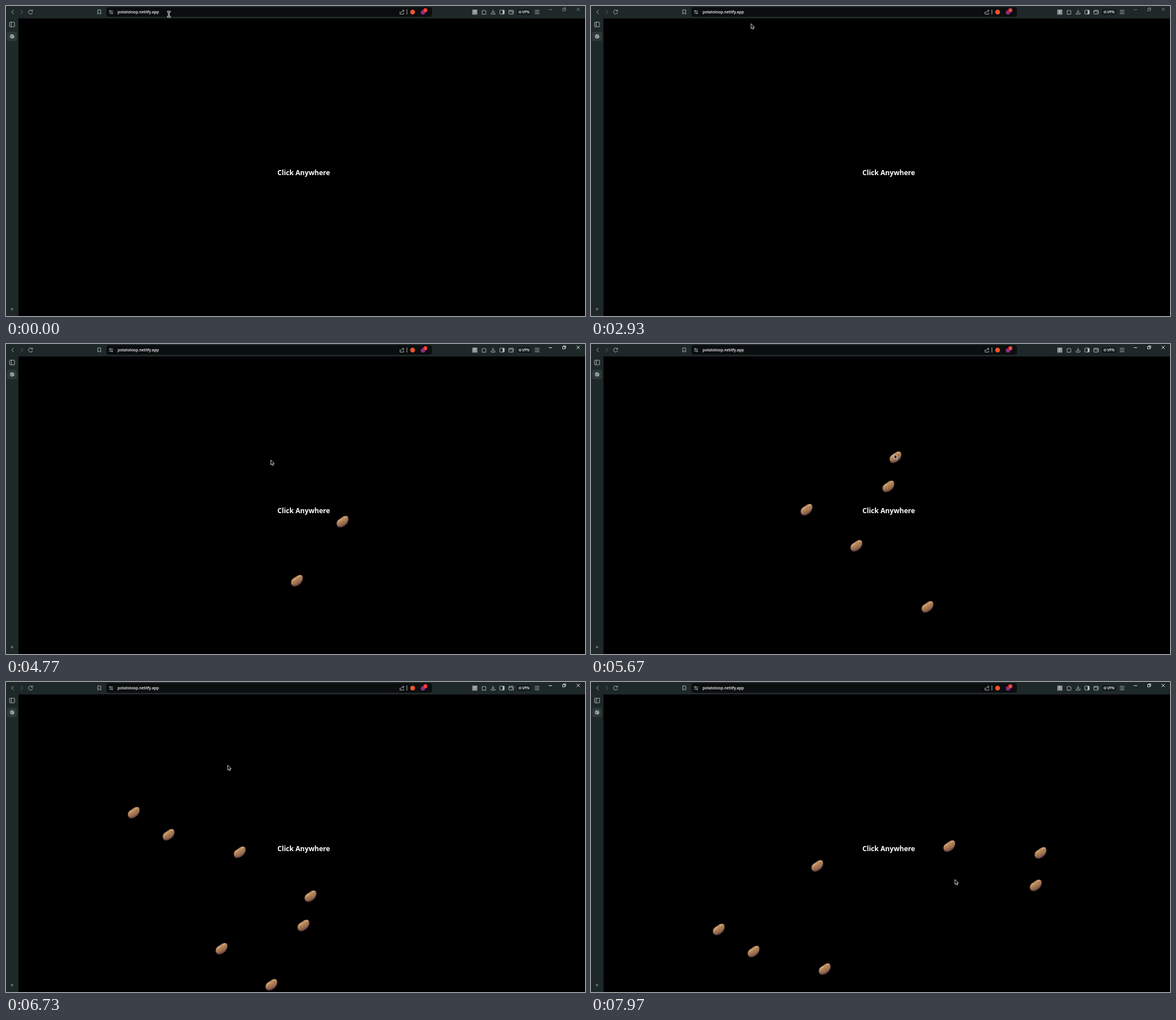
An HTML page that plays this animation: 1022x548 px, repeating every 8000 ms.

```html
<!DOCTYPE html>
<html lang="en">
<head>
<meta charset="utf-8">
<title>Falling potatoes</title>
<style>
html, body { margin: 0; width: 100%; height: 100%; overflow: hidden; background: #000; }
svg { display: block; width: 1022px; height: 548px; }
text { font-family: "Open Sans", "Noto Sans", sans-serif; fill: #fff; }
.line { fill: none; stroke: #bcc4c4; stroke-width: .9; }
</style>
</head>
<body>
<svg viewBox="0 0 1022 548">
  <defs>
    <linearGradient id="skin" x1=".3" y1=".15" x2=".75" y2=".9">
      <stop offset="0" stop-color="#c79c69"/>
      <stop offset=".55" stop-color="#ad7f54"/>
      <stop offset="1" stop-color="#85594a"/>
    </linearGradient>
    <g id="potato">
      <path fill="#6f4a46" d="M-10.6 3.6C-10.6-1-7.6-3.8-4-5.6C-1.4-7.2 1.6-10.3 6-10.3C9.8-10.3 11-6 10.4-2.2C9.2 4.6 1.5 10.2-4.5 10.2C-8.5 10.2-10.6 7.6-10.6 3.6Z"/>
      <path fill="url(#skin)" d="M-10 3.2C-9.8-.8-7-3.2-3.6-4.9C-1-6.5 2-9.6 6-9.6C9-9.6 10-6.6 9.3-3.4C8 2.6 1 7.6-4.8 7.6C-8 7.6-10 6-10 3.2Z"/>
      <path fill="none" stroke="#dcb480" stroke-width="1.2" stroke-linecap="round" d="M-7.8 .6C-6.4-1.4-4-2.6-2-3.6M3-7C4.4-8.1 6-8.4 7.2-7.8"/>
      <path fill="none" stroke="#7b5040" stroke-width=".9" stroke-linecap="round" d="M-5 3.6l1 .5M.5 .2l1.2-.2M5-3.4l1 .4M.6 4l.8-.4M6.4-6h.6"/>
    </g>
  </defs>

  <rect width="1022" height="548" fill="#1f2829"/>
  <rect x="22" y="22" width="1000" height="526"/>
  <rect x="177" y="2" width="575" height="17" rx="4.5" fill="#0b0e0f"/>

  <!-- toolbar -->
  <g class="line">
    <path d="M13.7 7L10 10.7L13.7 14.4"/>
    <path d="M26 7L29.7 10.7L26 14.4" stroke="#667071"/>
    <path d="M46.3 8.5A3.6 3.6 0 1 0 46.9 11.5M46.9 6.6V9.1H44.4"/>
    <path d="M162 7H167.2V14.4L164.6 12.2L162 14.4Z"/>
    <path d="M182 9H182.8M185.2 9H189M182 12.6H185.8M188.2 12.6H189"/>
    <circle cx="184" cy="9" r="1.2"/><circle cx="187" cy="12.6" r="1.2"/>
    <path d="M695.5 10V14.3H702V12M697.5 12C697.5 9.5 699 8.5 702.5 8.5M700.3 6.3L702.6 8.5L700.3 10.7"/>
    <path d="M707.7 6V15"/>
    <path d="M840.3 8.3H842.3A1.3 1.3 0 0 1 844.8 8.3H846.8V10.2A1.2 1.2 0 0 1 846.8 12.5V14.5H840.3V12.5A1.2 1.2 0 0 0 840.3 10.2Z"/>
    <path d="M859.8 6.6V12M857.4 9.8L859.8 12.2L862.2 9.8M856.4 12V14.3H863.2V12"/>
    <rect x="871.6" y="7.3" width="8" height="7" rx="1"/>
    <path d="M878 7.5V14" stroke-width="2.8"/>
    <rect x="887.6" y="7.5" width="8" height="6.8" rx="1.2"/><path d="M888 9.3H895.5M892.6 11.8H895.5"/>
    <path d="M933.5 7.7H941.5M933.5 10.7H941.5M933.5 13.7H941.5"/>
    <rect x="900.5" y="4" width="28" height="13.2" rx="4" style="fill:#161d1f;stroke:#2c3638"/>
    <circle cx="907.3" cy="10.7" r="2"/><path d="M905.2 10.7H909.4"/>
  </g>
  <text x="197" y="13.2" font-size="6.8" font-weight="600">potatoloop.netlify.app</text>
  <text x="911" y="13.1" font-size="6.4" font-weight="600">VPN</text>
  <circle cx="717.7" cy="10.7" r="4.2" fill="#f2552c"/>
  <circle cx="736" cy="11.4" r="3.8" fill="#8f2a86"/>
  <circle cx="740.2" cy="7.5" r="3.7" fill="#e2332c"/>
  <text x="740.2" y="9.5" font-size="5.5" text-anchor="middle">1</text>
  <rect x="823" y="6.3" width="9" height="9" fill="#8b9090"/>
  <text x="827.5" y="13.3" font-size="6.5" text-anchor="middle">T</text>
  <g id="controls" class="line">
    <path d="M958 6.5H964M1007.2 3.2L1012.8 8.8M1012.8 3.2L1007.2 8.8"/>
    <path d="M982.5 4.7H986.5V8.7H982.5ZM984 4.5V3.2H988V7.2H986.7"/>
  </g>

  <!-- sidebar -->
  <rect x="2" y="45.5" width="17" height="16.5" rx="3" fill="#2e383a"/>
  <circle cx="10.8" cy="53.8" r="3.8" fill="#a8b0b1"/>
  <path d="M7.8 53.4L10 54.4L10.4 56.6M11 51L11.6 52.6L13.6 53.2" fill="none" stroke="#2e383a" stroke-width=".9"/>
  <g class="line">
    <rect x="6.3" y="28.6" width="8.8" height="8.2" rx="1"/><path d="M9.3 29V36.6"/>
    <path d="M7.9 535.8H13.3M10.6 533.1V538.5" stroke="#8d9697"/>
  </g>

  <text x="525.5" y="299.4" font-size="12.1" font-weight="700" text-anchor="middle">Click Anywhere</text>
  <g id="potatoes"></g>
  <path id="arrow" d="M0 0V8.7L2 6.9L3.3 9.8L4.8 9.1L3.5 6.3H6.1Z" fill="#000" stroke="#fff" stroke-width=".8"/>
  <g id="beam" fill="none">
    <path d="M-3-4.5H3M-3 4.5H3M0-4.5V4.5" stroke="#fff" stroke-width="2.6"/>
    <path d="M-2.6-4.5H2.6M-2.6 4.5H2.6M0-4.5V4.5" stroke="#111" stroke-width=".9"/>
  </g>
</svg>
<script>
const LOOP = 8000, STEP = 1000 / 30;
const SPEED = 0.1674;   // fall in px per ms
const TRAVEL = 400;     // longest pointer move in ms

// Where the pointer rests, and when it leaves: start, address bar, one per click, end
const stops = [
  [0, 288.5, 16.5], [2850, 254.5, 11],
  [3523, 513.5, 210], [4146, 594, 210], [4774, 468.5, 207], [5095, 380.5, 197],
  [5376, 525, 203], [5649, 537.5, 197], [5958, 412.5, 171], [6149, 287, 172],
  [6382, 225.5, 172], [6910, 399.5, 148], [7155, 632.5, 154], [7385, 785, 262],
  [7597, 793.5, 240],
  [LOOP, 641, 353]
];
const clicks = stops.slice(2, -1);
const $ = id => document.getElementById(id);

const potatoes = clicks.map(() => {
  const use = document.createElementNS("http://www.w3.org/2000/svg", "use");
  use.setAttribute("href", "#potato");
  return $("potatoes").appendChild(use);
});

function place(el, visible, x, y) {
  el.style.display = visible ? "" : "none";
  el.setAttribute("transform", `translate(${x} ${y})`);
}

// The pointer eases to the next stop at once, then waits there
function pointerAt(t) {
  const next = stops.findIndex(stop => stop[0] > t);
  const [leave, x0, y0] = stops[next - 1], [end, x1, y1] = stops[next];
  const u = Math.min(1, (t - leave) / Math.min(TRAVEL, end - leave));
  const ease = u * u * (3 - 2 * u);
  return [x0 + (x1 - x0) * ease - 1, y0 + (y1 - y0) * ease - 2];
}

function draw(now) {
  const t = Math.floor((now % LOOP + 4) / STEP) * STEP % LOOP;
  clicks.forEach(([start, x, y], i) =>
    place(potatoes[i], t >= start, x, y + SPEED * (t - start)));

  const [x, y] = pointerAt(t);
  place($("beam"), y < 20, x, y);
  place($("arrow"), y >= 20, x, y);
  $("controls").style.stroke = t < clicks[0][0] ? "#7f8888" : "#f2f4f4";
}

const begin = performance.now();
function tick() {
  draw(performance.now() - begin);
  requestAnimationFrame(tick);
}
tick();
</script>
</body>
</html>
```
